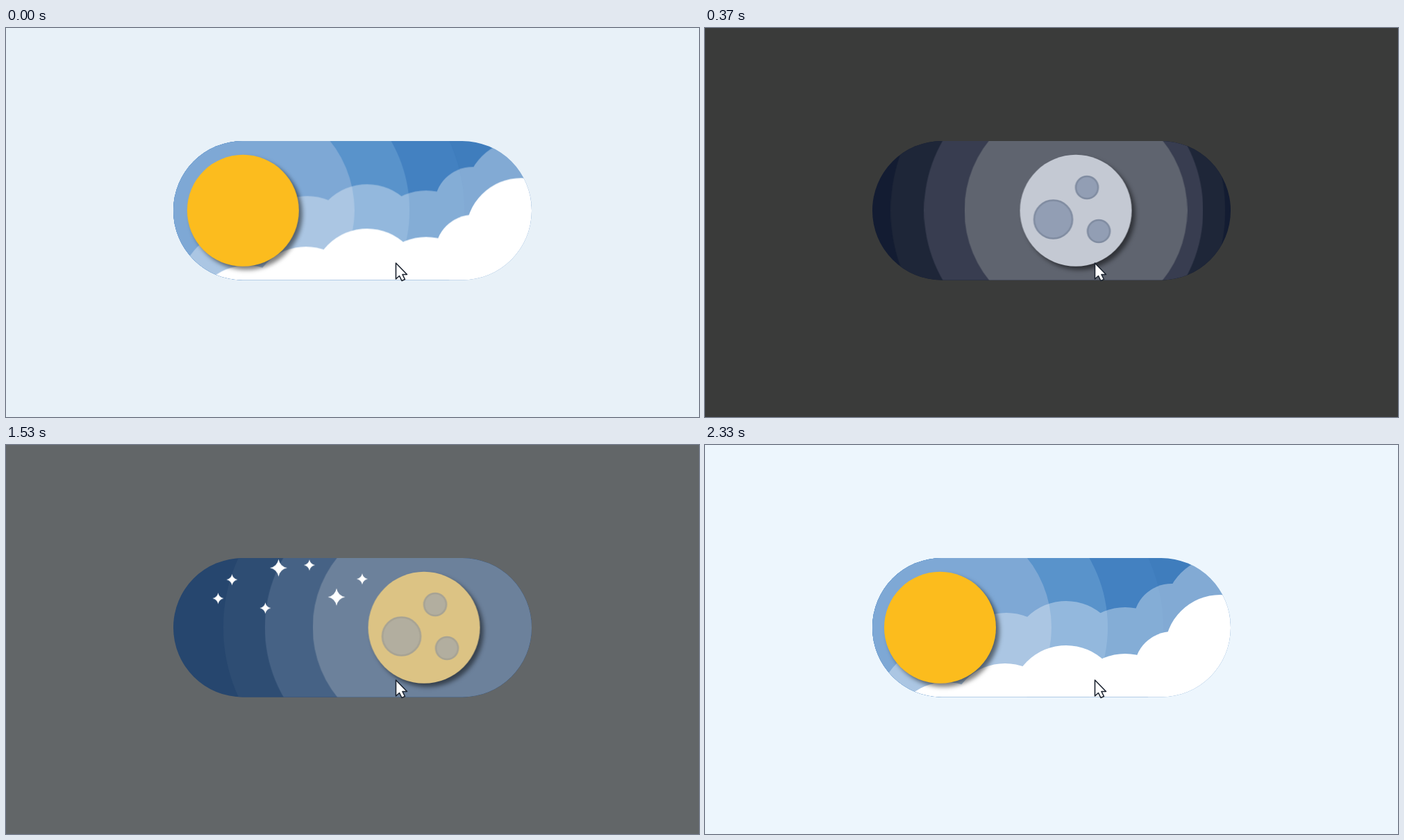
An HTML page without scripts that plays this animation: 998 by 561 pixels, repeating every 2360 ms.

```html
<!DOCTYPE html>
<html lang="en">
<head>
<meta charset="utf-8">
<title>Day and night switch</title>
<style>
  html, body { margin: 0; width: 100%; height: 100%; overflow: hidden; }
  svg { display: block; width: 998px; height: 561px; }

  svg, .tint, .craters, .sun, .ring1, .ring2, .ring3, .clouds, .stars {
    animation: 2360ms linear infinite;
  }
  svg { animation-name: page; }
  .tint { animation-name: tint; }
  .craters { animation-name: craters; fill: #929eb4; stroke: #808ca1; stroke-width: 2.5; }
  .sun { animation-name: sun; filter: drop-shadow(5px 5px 3px rgba(0, 0, 0, .5)); }
  .ring1 { animation-name: sun; }
  .ring2 { animation-name: ring2; }
  .ring3 { animation-name: ring3; }
  .clouds { animation-name: clouds; fill: #fff; }
  .stars { animation-name: stars; fill: #fff; }

  .sky { --day: #3f7dbd; --night: #131c32; }
  .ring3 { --day: #4381c1; --night: #1e2638; }
  .ring2 { --day: #5993cb; --night: #383d50; }
  .ring1 { --day: #7ea8d5; --night: #5f646f; }
  .disc { --day: #fcbc1d; --night: #c4c9d3; }

  /* Rings move and change colour at once */
  .ring1.tint { animation-name: sun, tint; }
  .ring2.tint { animation-name: ring2, tint; }
  .ring3.tint { animation-name: ring3, tint; }

  @keyframes page {
    0% { background: #e8f1f8; }
    7.2% { background: #a9aeb1; }
    15.6%, 59.3% { background: #3a3b3a; }
    64.83% { background: #626668; }
    76.27% { background: #c6ced4; }
    81%, 100% { background: #edf6fd; }
  }
  @keyframes tint {
    0%, 72.7%, 100% { fill: var(--day); }
    13.56%, 58.9% { fill: var(--night); }
  }
  @keyframes craters {
    0%, 72.7%, 100% { opacity: 0; }
    13.2%, 58.9% { opacity: 1; }
  }
  @keyframes sun {
    0% { transform: translateX(2.5px); animation-timing-function: cubic-bezier(.33, .2, .67, .63); }
    7.2% { transform: translateX(86px); }
    15.68% { transform: translateX(195px); animation-timing-function: cubic-bezier(.33, .62, .6, 1); }
    33.9%, 58.9% { transform: translateX(321px); animation-timing-function: cubic-bezier(.33, .15, .67, .6); }
    64.83% { transform: translateX(264px); }
    76.27% { transform: translateX(132px); animation-timing-function: cubic-bezier(.33, .58, .6, 1); }
    96.2%, 100% { transform: none; }
  }
  @keyframes ring2 {
    0% { transform: translateX(1px); animation-timing-function: cubic-bezier(.33, .2, .67, .63); }
    7.2% { transform: translateX(59px); }
    15.68% { transform: translateX(137px); animation-timing-function: cubic-bezier(.33, .62, .6, 1); }
    33.9%, 58.9% { transform: translateX(241px); animation-timing-function: cubic-bezier(.33, .15, .67, .6); }
    64.83% { transform: translateX(195px); }
    76.27% { transform: translateX(97px); animation-timing-function: cubic-bezier(.33, .58, .6, 1); }
    96.2%, 100% { transform: none; }
  }
  @keyframes ring3 {
    0% { transform: none; animation-timing-function: cubic-bezier(.33, .2, .67, .63); }
    7.2% { transform: translateX(38px); }
    15.68% { transform: translateX(89px); animation-timing-function: cubic-bezier(.33, .62, .6, 1); }
    33.9%, 58.9% { transform: translateX(160px); animation-timing-function: cubic-bezier(.33, .15, .67, .6); }
    64.83% { transform: translateX(135px); }
    76.27% { transform: translateX(63px); animation-timing-function: cubic-bezier(.33, .58, .6, 1); }
    96.2%, 100% { transform: none; }
  }
  @keyframes clouds {
    0% { transform: none; animation-timing-function: cubic-bezier(.33, .15, .67, .63); }
    7.2% { transform: translateY(121px); }
    12.5%, 78.2% { transform: translateY(212px); animation-timing-function: cubic-bezier(.3, .4, .4, 1); }
    98.3%, 100% { transform: none; }
  }
  @keyframes stars {
    0%, 18.2% { transform: translateY(-200px); animation-timing-function: cubic-bezier(.3, .4, .4, 1); }
    38.2%, 58.9% { transform: none; animation-timing-function: cubic-bezier(.33, .15, .67, .63); }
    64.83% { transform: translateY(-92px); }
    70.8%, 100% { transform: translateY(-200px); }
  }
</style>
</head>
<body>
<svg viewBox="0 0 998 561">
  <defs>
    <clipPath id="pill"><rect x="241" y="163" width="516" height="200.5" rx="100"/></clipPath>
    <path id="star" d="M0-18Q3-3 18 0Q3 3 0 18Q-3 3-18 0Q-3-3 0-18Z"/>
    <use id="mid" href="#star" transform="scale(.7)"/>
    <use id="small" href="#star" transform="scale(.45)"/>
  </defs>

  <g clip-path="url(#pill)">
    <rect class="sky tint" x="241" y="163" width="516" height="201"/>
    <circle class="ring3 tint" cx="419" cy="263" r="241"/>
    <circle class="ring2 tint" cx="379" cy="263" r="201"/>
    <circle class="ring1 tint" cx="338.5" cy="263" r="160.5"/>

    <g class="stars">
      <use href="#star" x="370.5" y="191.5"/>
      <use href="#star" x="524.5" y="218.5"/>
      <use href="#mid" x="309" y="229"/>
      <use href="#mid" x="392.5" y="270"/>
      <use href="#mid" x="476" y="312"/>
      <use href="#small" x="325.5" y="287"/>
      <use href="#small" x="305.5" y="314"/>
      <use href="#small" x="373.5" y="328"/>
      <use href="#small" x="437" y="266"/>
      <use href="#small" x="457" y="230"/>
      <use href="#small" x="513" y="286"/>
    </g>

    <g class="clouds">
      <g opacity=".35">
        <circle cx="332" cy="372" r="80"/>
        <circle cx="434" cy="322" r="80"/>
        <circle cx="520" cy="305" r="80"/>
        <circle cx="605" cy="314" r="80"/>
        <circle cx="672" cy="255" r="55"/>
        <circle cx="742" cy="241" r="80"/>
      </g>
      <circle cx="347" cy="422" r="80"/>
      <circle cx="432" cy="395" r="80"/>
      <circle cx="520" cy="369" r="80"/>
      <circle cx="605" cy="381" r="80"/>
      <circle cx="673" cy="324" r="55"/>
      <circle cx="742" cy="296" r="80"/>
    </g>

    <g class="sun">
      <circle class="disc tint" cx="338.5" cy="263.3" r="80.5"/>
      <g class="craters">
        <circle cx="306" cy="276" r="27.5"/>
        <circle cx="354.5" cy="230" r="16"/>
        <circle cx="371.5" cy="293" r="16"/>
      </g>
    </g>
  </g>

  <path d="M561.5 339V362L566.5 357.5L570 364.5L574.5 362.5L571 355.5H577.5Z"
        fill="#fff" stroke="#1c2430" stroke-width="1.6" stroke-linejoin="round"/>
</svg>
</body>
</html>
```
